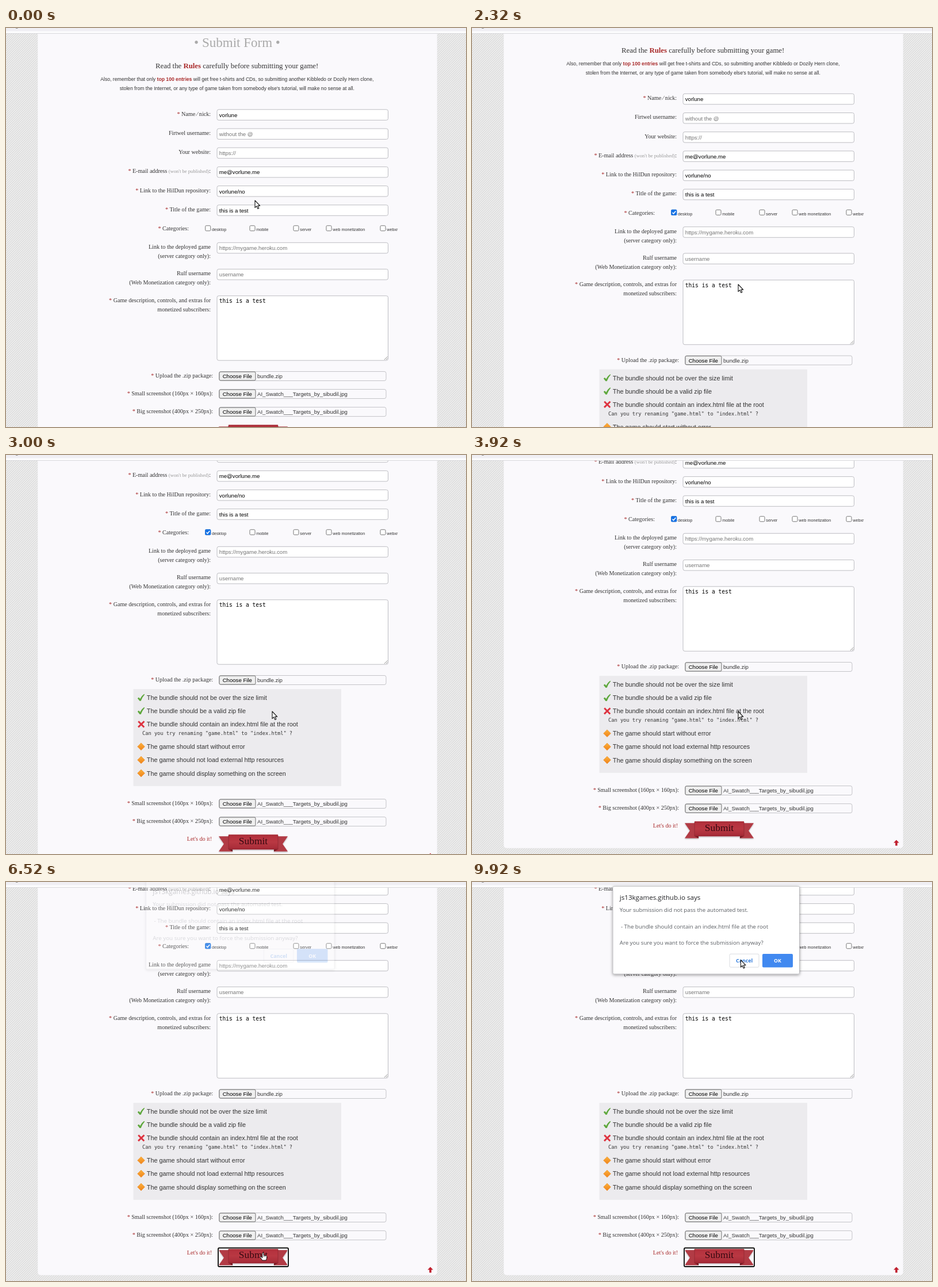
These frames come from a looping animation (800 by 694 pixels, 10000 ms). An HTML page:

```html
<!DOCTYPE html>
<html lang="en">
<head>
<meta charset="utf-8">
<title>Submit Form</title>
<style>
html, body { margin: 0; width: 100%; height: 100%; overflow: hidden; background: #fff; }
svg { display: block; width: 800px; height: 694px; }
text { font-family: "Liberation Sans", Arial, sans-serif; font-size: 9.6px; fill: #000; }
.serif { font-family: "Liberation Serif", "Times New Roman", serif; font-size: 10.08px; fill: #333; }
.mono { font-family: "DejaVu Sans Mono", monospace; }
.end { text-anchor: end; }
.mid { text-anchor: middle; }
.red { fill: #a92b2b; }
.bold { font-weight: bold; }
.note { font-size: 8.64px; fill: #999; }
.hint { fill: #757575; }
.small { font-size: 8.64px; fill: #333; }
.tiny { font-size: 7.2px; fill: #333; }
.item { font-size: 10.84px; fill: #333; }
.dlg text { font-family: "Open Sans", "Noto Sans", sans-serif; font-size: 9.68px; fill: #595d62; }
.dlg .btn { font-size: 8.8px; font-weight: 700; text-anchor: middle; }
</style>
</head>
<body>
<svg id="stage" viewBox="0 0 800 694" xmlns="http://www.w3.org/2000/svg"></svg>
<script>
const SHIFT = 184;

const text = (x, y, str, cls = "", extra = "") =>
  `<text x="${x}" y="${y}" class="${cls}" ${extra}>${str}</text>`;
const rect = (x, y, w, h, fill, stroke = "none", r = 0, extra = "") =>
  `<rect x="${x}" y="${y}" width="${w}" height="${h}" rx="${r}" fill="${fill}" stroke="${stroke}" ${extra}/>`;
const path = (d, fill, extra = "") => `<path d="${d}" fill="${fill}" ${extra}/>`;
const star = '<tspan class="red">* </tspan>';
const label = (y, str, x = 356) => text(x, y, str, "serif end");

function field(y, value, cls = "") {
  return rect(367, y, 297.5, 18.5, "#fff", "#bdbdc2", 3) + text(370.8, y + 13, value, cls);
}

function fileRow(y, name, str) {
  return label(y + 10.5, star + name, 360) +
    rect(370.5, y, 290.5, 16, "#faf9fc", "#c4c4c8", 3) +
    rect(371, y + .5, 63, 15, "#efefef", "#6f6f6f", 2) +
    text(402.3, y + 11.6, "Choose File", "mid") +
    text(437, y + 11.6, str, "", 'style="fill:#333"');
}

function checkbox(x, name, id = "") {
  return rect(x, 343.8, 9, 9, "#fff", "#767676", 1.6) + text(x + 11.3, 353, name, "tiny") +
    (id ? `<g id="${id}">${rect(x - .5, 343.3, 10, 10, "#1673e6", "none", 1.6)}` +
      path(`M${x + 1.8} 348.4l2 2.1l3.8-4.6`, "none", 'stroke="#fff" stroke-width="1.5"') + "</g>" : "");
}

const marks = {
  ok: y => path(`M228.8 ${y + 1.2}l2.1-1.7l2.4 2.5q3-5.8 7-8.3l.9.9q-4 4.5-6.6 11.2h-2.2z`, "#5fa83d"),
  bad: y => path(`M230.2 ${y - 5}l10 10.2m.2-10.2l-10.4 10.2`, "none", 'stroke="#de3340" stroke-width="2.9"'),
  skip: y => path(`M235 ${y - 6.4}l6.4 6.4l-6.4 6.4l-6.4-6.4z`, "url(#orange)", 'stroke="#e98318" stroke-width=".5"')
};
const item = (y, mark, str) => marks[mark](y - 4) + text(244.8, y, str, "item");

function ribbon() {
  const dark = "#6d1720", tail = "#b23a44";
  return '<g filter="url(#soft)">' +
    path("M370 693.2H394V719.6H370L379 706.4z", tail) +
    path("M490 693.2H466V719.6H490L481 706.4z", tail) +
    path("M387 716H394V719.6z", dark) + path("M473 716H466V719.6z", dark) +
    rect(387, 690.2, 86, 26, "url(#cloth)") + "</g>" +
    path("M387 692V716M473 692V716", "none", 'stroke="#8c2630" stroke-width=".7"') +
    path("M387 692H473M387 714.6H473", "none", 'stroke="#7f202b" stroke-width=".6" stroke-dasharray="1.5 1"') +
    text(430, 707.4, "Submit", "serif mid", 'style="font-size:17.4px;fill:#360810"') +
    `<g id="ring">${rect(369, 689.5, 122, 32.5, "none", "#fff", 2, 'stroke-width="3.4"')}` +
    rect(369, 689.5, 122, 32.5, "none", "#101010", 2, 'stroke-width="1.9"') + "</g>";
}

const defs = `<defs>
  <pattern id="hatch" width="4" height="4" patternUnits="userSpaceOnUse">
    <rect width="4" height="4" fill="#f0f0f0"/>
    <path d="M-1 1L1-1M0 4L4 0M3 5L5 3" stroke="#d6d6d6" stroke-width="1.1"/>
  </pattern>
  <linearGradient id="orange" x2="0" y2="1"><stop stop-color="#fbb13c"/><stop offset="1" stop-color="#f0821a"/></linearGradient>
  <linearGradient id="cloth" x2="0" y2="1"><stop stop-color="#b32f3b"/><stop offset=".5" stop-color="#b93843"/><stop offset="1" stop-color="#a62a36"/></linearGradient>
  <filter id="soft" x="-10%" y="-20%" width="120%" height="150%"><feDropShadow dx="0" dy="1" stdDeviation=".8" flood-opacity=".35"/></filter>
  <filter id="lift" x="-10%" y="-10%" width="120%" height="125%"><feDropShadow dx="0" dy="1.5" stdDeviation="2.5" flood-opacity=".4"/></filter>
  <clipPath id="view"><rect y="10" width="800" height="684"/></clipPath>
</defs>`;

const head =
  text(402, 33, "• Submit Form •", "serif mid", 'style="font-size:23.04px;fill:#aaa"') +
  text(401.7, 70, 'Read the <tspan class="red bold">Rules</tspan> carefully before submitting your game!', "serif mid", 'style="font-size:12.8px"') +
  text(401.8, 92, 'Also, remember that only <tspan class="red bold">top 100 entries</tspan> will get free t-shirts and CDs, so submitting another Kibbledo or Dozily Hern clone,', "small mid") +
  text(401.8, 108, "stolen from the Internet, or any type of game taken from somebody else's tutorial, will make no sense at all.", "small mid");

const rows = [
  [star + "Name ⁄ nick:", "vorlune"],
  ["Firtwel username:", "without the @", "hint"],
  ["Your website:", "https://", "hint"],
  [star + 'E-mail address <tspan class="note">(won\'t be published)</tspan>:', "me@vorlune.me"],
  [star + "Link to the HilDun repository:", "vorlune/no"],
  [star + "Title of the game:", "this is a test"]
].map(([name, value, cls], i) => {
  const y = 33.2 * i;
  return label(152.7 + y, name) + field(141.8 + y, value, cls);
}).join("");

const middle =
  label(352.3, star + "Categories:", 318) +
  checkbox(346.7, "desktop", "tick") + checkbox(424, "mobile") + checkbox(500, "server") +
  checkbox(557, "web monetization") + checkbox(651, "webxr") +
  label(384, "Link to the deployed game") + label(400, "(server category only):") +
  field(373.3, "https://mygame.heroku.com", "hint") +
  label(430.3, "Rulf username") + label(446.3, "(Web Monetization category only):") +
  field(419.4, "username", "hint") +
  label(476.5, star + "Game description, controls, and extras for") + label(492.5, "monetized subscribers:") +
  rect(367, 465.8, 297.5, 112.4, "#fff", "#bdbdc2", 3) +
  text(370.8, 478, "this is a test", "mono") +
  path("M658 577L663.5 571.5M661 577L663.5 574.5", "none", 'stroke="#777" stroke-width=".8"') +
  fileRow(597.5, "Upload the .zip package:", "bundle.zip");

const checklist = '<g id="list">' + rect(221.5, 621.2, 361.5, 168.6, "#ecebee") +
  item(640, "ok", "The bundle should not be over the size limit") +
  item(663.1, "ok", "The bundle should be a valid zip file") +
  item(686.2, "bad", "The bundle should contain an index.html file at the root") +
  text(237, 701.2, 'Can you try renaming "game.html" to "index.html" ?', "mono", 'style="font-size:8.68px;fill:#333"') +
  item(725.2, "skip", "The game should start without error") +
  item(748.4, "skip", "The game should not load external http resources") +
  item(771.5, "skip", "The game should display something on the screen") + "</g>";

const picture = "AI_Swatch___Targets_by_sibudil.jpg";
const lower = '<g id="lower">' +
  fileRow(628.5, "Small screenshot (160px × 160px):", picture) +
  fileRow(659.6, "Big screenshot (400px × 250px):", picture) +
  text(358, 701, "Let's do it!", "serif end", 'style="fill:#a92b2b"') + ribbon() +
  path("M738 722.5l4.8 5h-3v5h-3.6v-5h-3z", "#c01f2e") + "</g>";

const dialog = '<g id="dialog" class="dlg">' +
  rect(245, 7.5, 324.5, 152.5, "#fff", "#b4b4b8", 2, 'stroke-width=".8" filter="url(#lift)"') +
  text(256.8, 31, "js13kgames.github.io says", "", 'style="font-size:11.6px;fill:#202124"') +
  text(256.8, 51.7, "Your submission did not pass the automated test.") +
  text(259, 80.5, "- The bundle should contain an index.html file at the root") +
  text(256.8, 109.4, "Are you sure you want to force the submission anyway?") +
  rect(448, 125.2, 51, 23, "#fff", "#dadce0", 2) +
  rect(505, 124.9, 53, 23.6, "#4189f0", "none", 2) +
  text(473.6, 140.2, "Cancel", "btn", 'style="fill:#2f7bdc"') +
  text(531.5, 140.2, "OK", "btn", 'style="fill:#fff"') + "</g>";

const pointers =
  '<g id="arrow">' + path("M0 0V12.4L2.8 9.8L4.8 14.4L6.8 13.5L4.9 9.1H8.7Z", "#fff", 'stroke="#111" stroke-width="1.1" stroke-linejoin="round"') + "</g>" +
  '<g id="hand">' + path("M-1.2 .4Q0-.8 1.2 .4V4L5.6 5Q6.8 5.4 6.7 7Q6.6 10.6 5.3 13H-1.4Q-3 9.8-5.3 7.6Q-5.2 6-3.4 7L-1.2 8.6Z", "#fff", 'stroke="#111" stroke-width="1" stroke-linejoin="round"') +
  path("M1.4 4.2V7M3.6 4.8V7", "none", 'stroke="#111" stroke-width=".7"') + "</g>";

document.getElementById("stage").innerHTML = defs +
  rect(0, 0, 800, 694, "url(#hatch)") +
  '<g clip-path="url(#view)"><g id="page">' +
  '<rect id="sheet" x="55" y="-60" width="695" rx="5" fill="#faf9fc" stroke="#e6e6e8" stroke-width=".6"/>' +
  head + rows + middle + checklist + lower + "</g></g>" +
  rect(0, 0, 800, 10, "#fcfcfd") + rect(0, 0, 800, 5.5, "#f0eff4") + rect(0, 9, 800, 1, "#d9d9dc") +
  rect(17, 0, 3.5, .8, "#777") + dialog + pointers;

const $ = id => document.getElementById(id);
const show = (id, on) => $(id).setAttribute("display", on ? "inline" : "none");
const move = (id, x, y) => $(id).setAttribute("transform", `translate(${x} ${y})`);

// Keys are [time, ...values]; values are linear between keys.
function track(keys, t) {
  const i = keys.findIndex(k => k[0] > t);
  if (i < 0) return keys[keys.length - 1].slice(1);
  if (i === 0) return keys[0].slice(1);
  const a = keys[i - 1], b = keys[i], p = (t - a[0]) / (b[0] - a[0]);
  return a.slice(1).map((v, j) => v + (b[j + 1] - v) * p);
}

const scrollKeys = [[2200, 0], [2300, 27.5], [2700, 126], [3000, 214], [3100, 231], [3200, 237]];
const mouseKeys = [
  [0, 433, 300], [500, 375, 336], [800, 350, 347], [1300, 350, 347], [1600, 430, 420], [1900, 463, 446],
  [4800, 463, 446], [5100, 466, 560], [5400, 470, 646], [5700, 470, 646], [6100, 447, 645],
  [6900, 447, 645], [7400, 462, 590], [8000, 490, 300], [8500, 508, 150],
  [9400, 500, 216], [9500, 500, 216], [9900, 467.4, 135.7]
];
const dialogKeys = [[6400, 0, -11, 1.013], [6500, .2, -9, 1.01], [6600, .75, -3, 1.003], [6700, 1, 0, 1]];

function draw(ms) {
  // ten pictures a second, odd ones 20 ms late
  const t = Math.floor(ms / 200) * 200 + (ms % 200 >= 120 ? 100 : 0);
  const checked = t >= 1200, shift = checked ? SHIFT : 0;
  move("page", 0, -track(scrollKeys, t)[0]);
  move("lower", 0, shift);
  $("sheet").setAttribute("height", 797 + shift);
  show("tick", checked);
  show("list", checked);
  show("ring", t >= 6400);

  const [alpha, dy, scale] = track(dialogKeys, t);
  show("dialog", alpha > 0);
  $("dialog").setAttribute("opacity", alpha);
  $("dialog").setAttribute("transform", `translate(407 ${84 + dy}) scale(${scale}) translate(-407 -84)`);

  const [x, y] = track(mouseKeys, t);
  const over = y > 637;
  show("arrow", !over);
  show("hand", over);
  move(over ? "hand" : "arrow", x, y);
}

const start = performance.now();
function loop() {
  draw((performance.now() - start) % 10000);
  requestAnimationFrame(loop);
}
loop();
</script>
</body>
</html>
```
